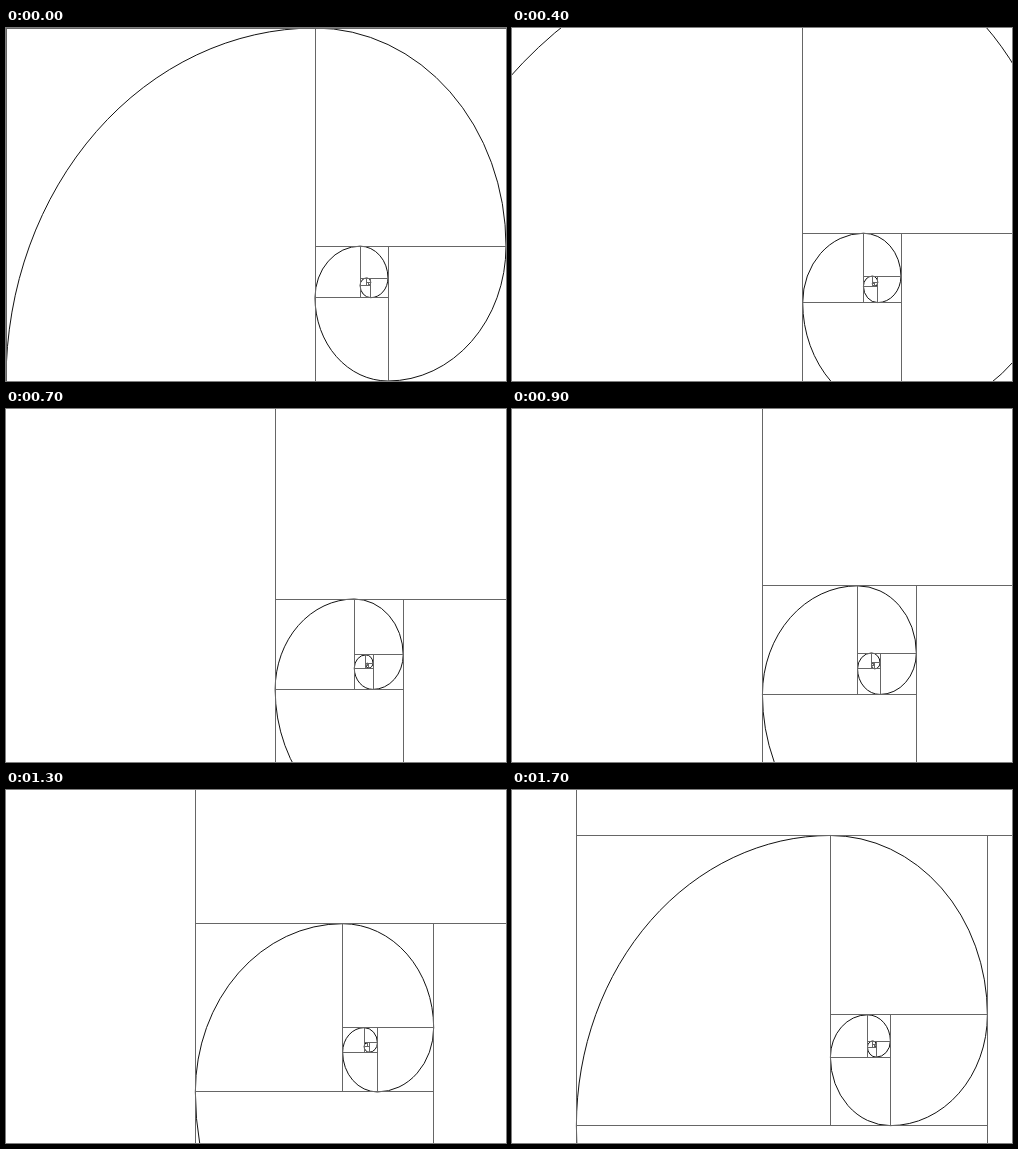
Animation of 500x353 px, one loop 1.8 s. Source, as an HTML page:

```html
<!DOCTYPE html>
<html lang="en">
<head>
<meta charset="utf-8">
<title>Golden spiral zoom</title>
<style>
  html, body { margin: 0; width: 100%; height: 100%; overflow: hidden; background: #fff; }
  svg { display: block; }
  path { fill: none; stroke-width: 1; }
  #curve { stroke: #111; }
  #grid { stroke: #666; stroke-linecap: square; shape-rendering: crispEdges; }
</style>
</head>
<body>
<svg width="500" height="353" viewBox="0 0 500 353"><path id="curve"/><path id="grid"/></svg>
<script>
const W = 500, H = 353, LOOP = 1800, STEP = 100;
const G = (Math.sqrt(5) - 1) / 2;
// The point the spiral winds into; zooming by 1 / G^4 maps the figure onto itself.
const eyeX = W * G / (1 - G ** 4), eyeY = H * G / (1 - G ** 4);
const zoomKeys = [[0, 1], [4, 1.347], [7, 1.755], [11, 2.584], [13, 3.267], [15, 4.215], [17, 5.634]];
const curve = document.getElementById('curve');
const grid = document.getElementById('grid');

// 1 / sqrt(zoom) falls almost linearly, so interpolate in that space.
function zoomAt(step) {
  const i = Math.max(1, zoomKeys.findIndex(([k]) => k >= step));
  const [k0, z0] = zoomKeys[i - 1], [k1, z1] = zoomKeys[i];
  const a = z0 ** -0.5, b = z1 ** -0.5;
  return (a + (b - a) * (step - k0) / (k1 - k0)) ** -2;
}

function drawSpiral(zoom) {
  const px = x => eyeX + (x - eyeX) * zoom;
  const py = y => eyeY + (y - eyeY) * zoom;
  const snap = v => Math.floor(v + 0.06) + 0.5;
  let arcs = '', lines = '';
  const line = (x0, y0, x1, y1) => {
    lines += `M${snap(px(x0))} ${snap(py(y0))}L${snap(px(x1))} ${snap(py(y1))}`;
  };
  const arc = (x0, y0, x1, y1) => {
    const rx = Math.abs(x1 - x0) * zoom, ry = Math.abs(y1 - y0) * zoom;
    arcs += `M${px(x0)} ${py(y0)}A${rx} ${ry} 0 0 1 ${px(x1)} ${py(y1)}`;
  };

  let l = 0, t = 0, r = W, b = H;
  line(l, t, r, t);
  line(l, t, l, b);
  for (let i = 0; (r - l) * zoom > 2; i++) {
    const w = (r - l) * G, h = (b - t) * G;
    if (i % 4 === 0) {
      const m = l + w;
      arc(l, b, m, t);
      line(m, t, m, b);
      l = m;
    } else if (i % 4 === 1) {
      const m = t + h;
      arc(l, t, r, m);
      line(l, m, r, m);
      t = m;
    } else if (i % 4 === 2) {
      const m = r - w;
      arc(r, t, m, b);
      line(m, t, m, b);
      r = m;
    } else {
      const m = b - h;
      arc(r, b, l, m);
      line(l, m, r, m);
      b = m;
    }
  }
  curve.setAttribute('d', arcs);
  grid.setAttribute('d', lines);
}

function draw() {
  const step = Math.floor(performance.now() % LOOP / STEP);
  drawSpiral(zoomAt(step));
  requestAnimationFrame(draw);
}
draw();
</script>
</body>
</html>
```
